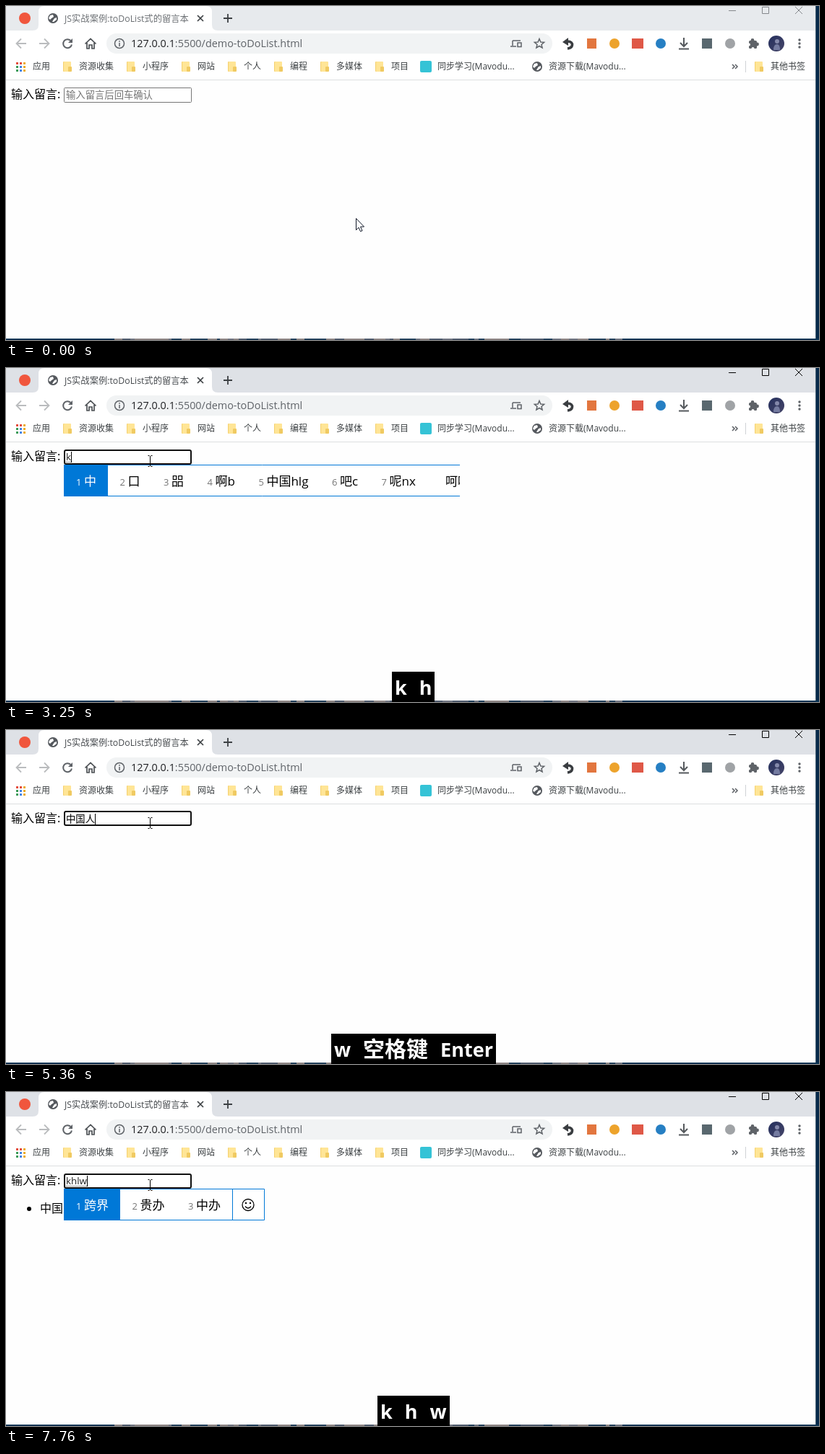
An HTML page with a canvas for the animation above (8 s loop, 1125 px wide and 463 px high).

```html
<!DOCTYPE html>
<html lang="zh">
<head>
<meta charset="utf-8">
<title>toDoList</title>
<style>
html, body { margin: 0; width: 100%; height: 100%; overflow: hidden; background: #fefefe; }
canvas { display: block; }
</style>
</head>
<body>
<canvas id="stage" width="1125" height="463"></canvas>
<script>
const g = document.getElementById('stage').getContext('2d');
const LOOP = 8000, TAU = Math.PI * 2;
const FONTS = '"Open Sans", "Noto Sans CJK SC", "Noto Sans CJK", sans-serif';
const BLUE = '#0078d7', ICON = '#5f6368', INK = '#3c4043';

const candidates = {
  k: ['中', '口', '㗊', '啊b', '中国hlg', '吧c', '呢nx'],
  kh: ['中', '中国lg', '跟换rq', '跟v', '踩es', '路t', '中心ny'],
  w: ['人', '从w', '个h', '分钟qk', '他b', '代理gj', '全部gu'],
  khl: ['中', '中国g', '跨界w', '贵办t', '中办w', '中转y', '足够q'],
  khlw: ['跨界', '贵办', '中办']
};

// Each step changes part of the state from its time on.
const steps = [
  [0, { text: '', typing: '', list: '', keys: [] }],
  [900, { active: true }],
  [970, { focus: true }],
  [1050, { caret: true }],
  [1520, { caret: false }],
  [2000, { caret: true }],
  [2230, { keys: ['Ctrl +', '空格键'] }],
  [2540, { caret: false }],
  [3090, { caret: true }],
  [3170, { keys: ['k'] }],
  [3250, { keys: ['k', 'h'], typing: 'k', list: 'k', clip: 628 }],
  [3330, { typing: 'kh', list: 'kh', clip: 0 }],
  [3810, { caret: false }],
  [4120, { keys: ['h'] }],
  [4200, { keys: [] }],
  [4350, { caret: true }],
  [4430, { keys: ['2'], text: '中国', typing: '', list: '' }],
  [4810, { keys: ['2', 'w'], typing: 'w', list: 'w' }],
  [4980, { keys: ['2', 'w', '空格键'], text: '中国人', typing: '', list: '' }],
  [5360, { keys: ['w', '空格键', 'Enter'] }],
  [5440, { text: '', saved: true }],
  [5750, { keys: ['空格键', 'Enter'] }],
  [5900, { keys: ['Enter'] }],
  [5970, { caret: false }],
  [6280, { keys: [] }],
  [6520, { caret: true }],
  [6980, { caret: false }],
  [7150, { keys: ['k'], typing: 'k', caret: true }],
  [7210, { keys: ['k', 'h'], typing: 'kh', list: 'kh' }],
  [7610, { keys: ['k', 'h', 'l'], typing: 'khl', list: 'khl' }],
  [7760, { keys: ['k', 'h', 'w'], typing: 'khlw', list: 'khlw' }]
];
const stateAt = t => Object.assign({}, ...steps.filter(s => s[0] <= t).map(s => s[1]));

function setFont(size, weight = '') { g.font = `${weight} ${size}px ${FONTS}`; }
function text(str, x, y, size, color, weight) {
  setFont(size, weight);
  g.fillStyle = color;
  g.fillText(str, x, y);
  return g.measureText(str).width;
}
function box(x, y, w, h, color) { g.fillStyle = color; g.fillRect(x, y, w, h); }
function round(x, y, w, h, r, fill, stroke, width = 1) {
  g.beginPath();
  g.roundRect(x, y, w, h, r);
  if (fill) { g.fillStyle = fill; g.fill(); }
  if (stroke) { g.strokeStyle = stroke; g.lineWidth = width; g.stroke(); }
}
function dot(x, y, r, color) {
  g.fillStyle = color;
  g.beginPath();
  g.arc(x, y, r, 0, TAU);
  g.fill();
}
function path(d, x, y, stroke, width = 1, fill) {
  const p = new Path2D(d);
  g.save();
  g.translate(x, y);
  if (fill) { g.fillStyle = fill; g.fill(p); }
  if (stroke) { g.strokeStyle = stroke; g.lineWidth = width; g.stroke(p); }
  g.restore();
}

function globe(x, y) {
  dot(x, y, 7, '#55595e');
  path('M-4-4L0-5L1-2L-2 0L-4 2L-6 0ZM2 0L5-1L5 2L1 5L-1 5L0 3Z', x, y, null, 0, '#fff');
}
function folder(x, label) {
  round(x, 77, 9, 14, 1, '#f4d06f');
  round(x + 1, 77, 10, 14, 1, '#ffe596');
  round(x + 7, 84, 5, 7, 1, '#f0ca62');
  text(label, x + 22, 88, 12, INK);
}

function desktop() {
  box(1120, 0, 5, 463, '#06294a');
  box(1120, 0, 1, 463, '#51687b');
  box(0, 461, 1125, 2, '#0c3555');
  let seed = 7;
  for (let x = 150; x < 850;) {
    seed = seed * 16807 % 2147483647;
    const w = 4 + seed % 14;
    box(x, 461, w, 2, ['#6f7480', '#8d8584', '#24415c', '#4e5a6c'][seed % 4]);
    x += w;
  }
}

function titleBar(active) {
  box(0, 0, 1120, 34, active ? '#dee1e6' : '#e7eaed');
  path('M37 34Q45 34 45 26V8Q45 0 53 0H277Q285 0 285 8V26Q285 34 293 34Z', 0, 0, null, 0, '#fff');
  dot(26, 17, 8, '#f0563d');
  globe(65, 17);
  text('JS实战案例:toDoList式的留言本', 81, 22, 12.3, active ? '#45494d' : '#6b6f73');
  path('M-4-4L4 4M4-4L-4 4', 269, 17, INK, 1.7);
  path('M-6 0H6M0-6V6', 307, 17, INK, 1.8);
  const color = active ? '#000' : '#85888c';
  path('M1000 6.5H1010M1046.5 1.5H1055.5V10.5H1046.5ZM1092 1L1102 11M1102 1L1092 11', 0, 0, color);
}

function toolbar() {
  box(0, 34, 1120, 68, '#fff');
  const arrow = 'M7 0H-6M0-6.5L-6.5 0L0 6.5';
  path(arrow, 21, 52, '#babcbe', 1.8);
  g.save();
  g.scale(-1, 1);
  path(arrow, -53, 52, '#babcbe', 1.8);
  g.restore();
  path('M4.5-4A6 6 0 1 0 6 1.5', 85, 52, ICON, 2);
  path('M7-7V-1H1Z', 85, 52, null, 0, ICON);
  path('M-7.5 .5L0-6.5L7.5 .5M-5-1V7H-2V2H2V7H5V-1', 117, 52, '#4b4f53', 1.7);

  round(139, 38, 617, 28, 14, '#f1f3f4');
  path('M6.5 0A6.5 6.5 0 1 1-6.5 0A6.5 6.5 0 1 1 6.5 0M0-1V4M0-4V-2.3', 157, 52, ICON, 1.5);
  const host = text('127.0.0.1', 173, 57, 14.4, '#202124');
  text(':5500/demo-toDoList.html', 173 + host, 57, 14.4, ICON);
  path('M-5-4H6M-5-4V3M-8 4H0M2-1H7V4.5H2Z', 706, 52, ICON, 1.5);
  path('M0-6.5L1.9-2L6.6-1.7L3 1.4L4.1 6L0 3.5L-4.1 6L-3 1.4L-6.6-1.7L-1.9-2Z', 738, 52, ICON, 1.5);

  // Extension buttons
  path('M-2 6C6 5 7-3-1-4', 779, 53, '#3a3d41', 3.6);
  path('M-9-2L-1-8V3Z', 779, 52, null, 0, '#3a3d41');
  box(804, 45, 13, 14, '#e2763f');
  dot(842, 52, 7, '#eda32c');
  box(866, 45, 16, 14, '#df5847');
  dot(906, 52, 7, '#267fc3');
  path('M0-8V4M-5-1L0 4L5-1M-7 7.5H7', 938, 52, '#55595d', 2);
  box(963, 45, 14, 14, '#59686f');
  dot(1002, 52, 7, '#a0a3a6');
  round(1028, 48, 11, 11, 1.5, ICON);
  dot(1033, 47.5, 2.4, ICON);
  dot(1039.5, 53, 2.4, ICON);
  dot(1028, 53.5, 2, '#fff');
  dot(1033.5, 59, 2, '#fff');
  const night = g.createLinearGradient(1055, 41, 1077, 63);
  night.addColorStop(0, '#25305e');
  night.addColorStop(1, '#454568');
  dot(1066, 52, 11, night);
  dot(1067, 49, 3, '#8489ab');
  path('M-4 8Q-4 0 1 0Q5 0 5 8Z', 1066, 53, null, 0, '#747ba0');
  for (const y of [47, 52, 57]) dot(1098, y, 1.7, ICON);
}

function bookmarks() {
  const colors = ['#e34c3c', '#e34c3c', '#ecac28', '#3b9b58', '#4385e8', '#ecac28', '#3b9b58', '#4385e8', '#ecac28'];
  colors.forEach((c, i) => box(14 + i % 3 * 5, 78 + Math.floor(i / 3) * 5, 3, 3, c));
  text('应用', 37, 88, 12, INK);
  folder(79, '资源收集');
  folder(167, '小程序');
  folder(243, '网站');
  folder(307, '个人');
  folder(371, '编程');
  folder(435, '多媒体');
  folder(511, '项目');
  round(573, 76, 16, 16, 2, '#35c3d6');
  text('同步学习(Mavodu...', 597, 88, 12, INK);
  globe(735, 84);
  text('资源下载(Mavodu...', 751, 88, 12, INK);
  path('M-4-3L-1 0L-4 3M0-3L3 0L0 3', 1009, 84, ICON, 1.6);
  box(1023, 76, 1, 16, '#d0d3d6');
  folder(1036, '其他书签');
  box(0, 102, 1120, 1, '#dcdee0');
}

function inputField(s, hover) {
  text('输入留言:', 7, 128, 16, '#000');
  const lift = s.text ? 1 : 0;
  if (s.focus) round(81, 114 - lift, 175, 19, 2, '#fff', '#101010', 2);
  else round(80.5, 113.5, 176, 20, 1, '#fff', hover ? '#4f4f4f' : '#767676');
  if (!s.text && !s.typing) text('输入留言后回车确认', 83, 128, 13.33, '#757575');
  const start = 83 + text(s.text, 83, 128, 13.33, '#000');
  const end = start + text(s.typing, start, 128, 13.33, '#222');
  for (let x = start; x < end; x += 2) box(Math.round(x), 130, 1, 1, '#333');
  if (s.caret) box(Math.max(84, Math.round(end)), 116, 1, 15, '#000');
  return Math.round(start) - 3;
}

function savedItem() {
  dot(32, 162, 3, '#000');
  text('中国人', 47, 167, 16, '#000');
  round(95.5, 150.5, 42, 22, 2.5, '#efefef', '#767676');
  text('删除', 103, 167, 13.33, '#000');
}

function candidateList(name, left, clip) {
  const items = candidates[name];
  setFont(17);
  const widths = items.map(item => g.measureText(item).width + 43.5);
  const divider = Math.round(left + 1 + widths.reduce((a, b) => a + b));
  g.save();
  g.beginPath();
  g.rect(left, 134, (clip || divider + 45) - left, 44);
  g.clip();
  const width = clip ? 700 : divider + 45 - left;
  round(left + 0.5, 134.5, width - 1, 43, 0, '#fff', BLUE);
  box(left, 134, Math.round(widths[0] + 1), 44, BLUE);
  let x = left + 1;
  items.forEach((item, i) => {
    text(i + 1, x + 16, 163, 13, i ? '#767676' : '#fff');
    text(item, x + 27, 163, 17, i ? '#000' : '#fff');
    x += widths[i];
  });
  if (clip) text('呵呵', 608, 163, 17, '#000');
  else {
    box(divider, 134, 1, 44, BLUE);
    path('M8 0A8 8 0 1 1-8 0A8 8 0 1 1 8 0M-4 2Q0 7 4 2', divider + 22, 156.5, '#000', 1.3);
    dot(divider + 19, 154, 1.2, '#000');
    dot(divider + 25, 154, 1.2, '#000');
  }
  g.restore();
}

function keyOverlay(keys) {
  if (!keys.length) return;
  const gap = 17;
  const sizes = keys.map(key => /[\u4e00-\u9fff]/.test(key) ? 30 : 27);
  const widths = keys.map((key, i) => {
    setFont(sizes[i], 'bold');
    return g.measureText(key).width;
  });
  const total = widths.reduce((a, b) => a + b) + gap * (keys.length - 1) + 8;
  let x = Math.round(563.5 - total / 2);
  box(x, 421, Math.round(total), 42, '#000');
  x += 4;
  keys.forEach((key, i) => {
    text(key, x, 453, sizes[i], '#fff', 'bold');
    x += widths[i] + gap;
  });
}

function pointerAt(t) {
  const p = Math.min(9, Math.max(0, Math.floor((t - 70) / 75) + 1)) / 9;
  const e = p * p * (3 - 2 * p);
  return { x: Math.round(484 - 285 * e), y: Math.round(294 - 165 * e) };
}
function pointer({ x, y }, beam) {
  if (beam) path('M-3-7.5H-1M1-7.5H3M0-7V7M-3 7.5H-1M1 7.5H3', x + 0.5, y, '#000');
  else path('M.5.5V16.5L4 13L6.5 18.5L9 17.5L6.5 12H11.5Z', x, y, '#101828', 1, '#fff');
}

function draw() {
  const t = performance.now() % LOOP;
  const s = stateAt(t);
  const mouse = pointerAt(t);
  const hover = mouse.x < 257 && mouse.y < 134;
  box(0, 0, 1125, 463, '#fefefe');
  desktop();
  titleBar(s.active);
  toolbar();
  bookmarks();
  if (s.saved) savedItem();
  const left = inputField(s, hover);
  if (s.list) candidateList(s.list, left, s.clip);
  keyOverlay(s.keys);
  pointer(mouse, hover);
  requestAnimationFrame(draw);
}
draw();
</script>
</body>
</html>
```
